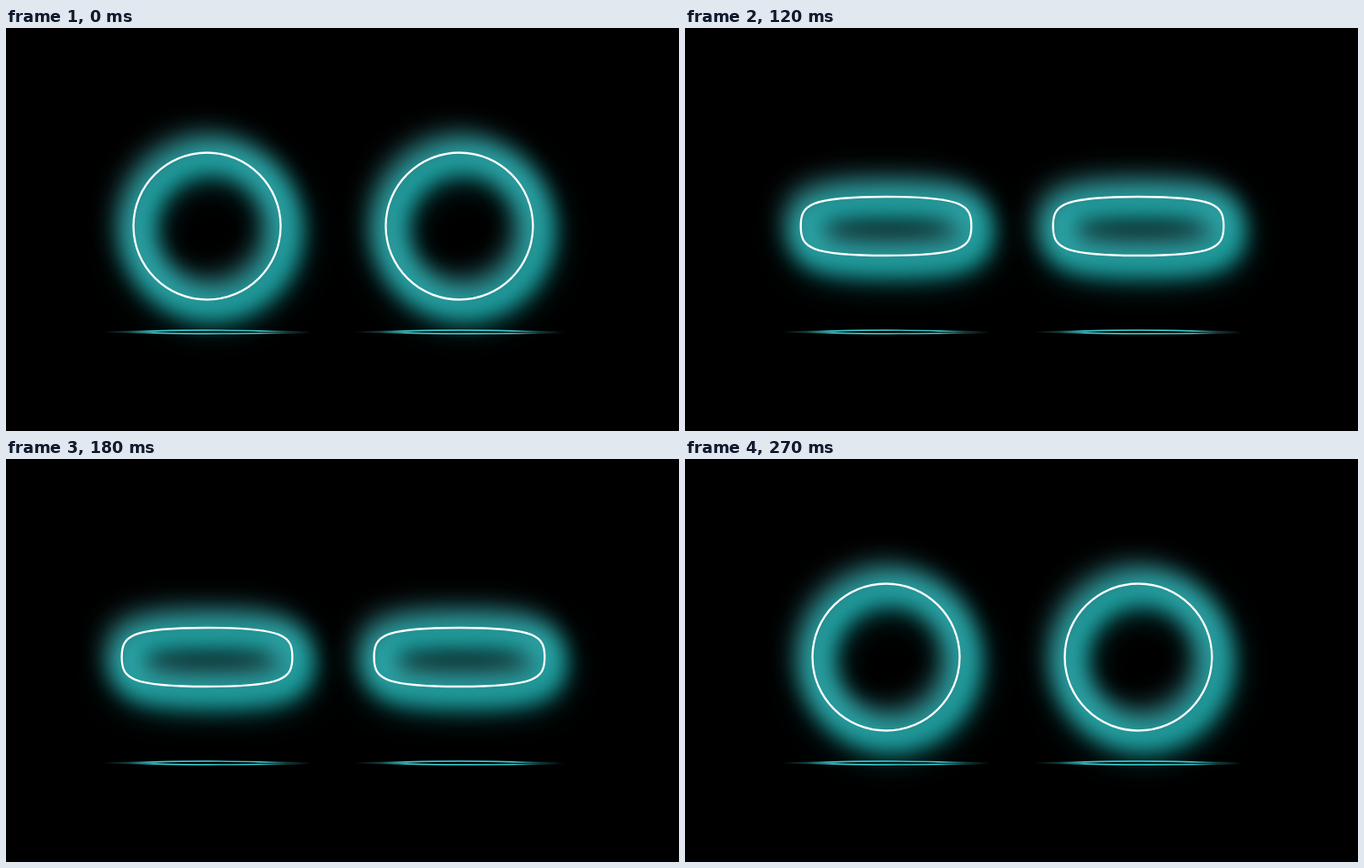
Write an HTML page that moves like this. It is 800 px wide and 480 px high and loops after 360 ms.

```html
<!DOCTYPE html>
<html lang="en">
<head>
<meta charset="utf-8">
<title>Blinking neon eyes</title>
<style>
  html, body { margin: 0; width: 100%; height: 100%; overflow: hidden; background: #000; }
  svg { display: block; width: 800px; height: 480px; }

  .eye { fill: none; animation: blink 360ms infinite; }
  .halo { stroke: #18a5a5; stroke-width: 34; stroke-opacity: .6; filter: blur(20px); }
  .teal { stroke: #18a3a3; stroke-width: 30; filter: blur(13px); }
  .pale { stroke: #5abac2; stroke-width: 34; stroke-opacity: .38; filter: blur(15px); }
  .line { stroke: #fff; stroke-width: 2.4; }
  .floor { fill: none; stroke: url(#fade); stroke-width: 1.6; }

  /* Four equal steps closing, four opening, 30 ms each */
  @keyframes blink {
    0%, 8.333% {
      d: path("M-87.5 0 C-87.5 -48.3 -48.3 -87.5 0 -87.5 S87.5 -48.3 87.5 0 S48.3 87.5 0 87.5 S-87.5 48.3 -87.5 0 Z");
      animation-timing-function: steps(4, end);
    }
    41.66% {
      d: path("M-106 0 C-106 -17 -107 -17.5 0 -17.5 S106 -17 106 0 S107 17.5 0 17.5 S-106 17 -106 0 Z");
      animation-timing-function: steps(4, end);
    }
    75%, 100% {
      d: path("M-87.5 0 C-87.5 -48.3 -48.3 -87.5 0 -87.5 S87.5 -48.3 87.5 0 S48.3 87.5 0 87.5 S-87.5 48.3 -87.5 0 Z");
    }
  }
</style>
</head>
<body>
<svg viewBox="0 0 800 480">
  <defs>
    <linearGradient id="fade" gradientUnits="userSpaceOnUse" x1="-124" y1="0" x2="124" y2="0">
      <stop offset="0" stop-color="#3fd0d4" stop-opacity="0"/>
      <stop offset=".12" stop-color="#3fd0d4" stop-opacity=".3"/>
      <stop offset=".25" stop-color="#3fd0d4"/>
      <stop offset=".5" stop-color="#35c0c4"/>
      <stop offset=".75" stop-color="#3fd0d4"/>
      <stop offset=".88" stop-color="#3fd0d4" stop-opacity=".3"/>
      <stop offset="1" stop-color="#3fd0d4" stop-opacity="0"/>
    </linearGradient>
    <path id="lens" d="M-124 0 C-70 -.4 -50 -2.1 0 -2.1 S70 -.4 124 0 S50 2.1 0 2.1 S-70 .4 -124 0 Z"/>
  </defs>

  <g transform="translate(239 236)">
    <g transform="translate(6 9)"><path class="eye halo"/></g>
    <g transform="translate(7 7)"><path class="eye teal"/></g>
    <g transform="translate(-4 -10)"><path class="eye pale"/></g>
    <path class="eye line"/>
  </g>
  <g transform="translate(538.9 236)">
    <g transform="translate(6 9)"><path class="eye halo"/></g>
    <g transform="translate(7 7)"><path class="eye teal"/></g>
    <g transform="translate(-4 -10)"><path class="eye pale"/></g>
    <path class="eye line"/>
  </g>

  <use href="#lens" class="floor" transform="translate(239 362)"/>
  <use href="#lens" class="floor" transform="translate(539 362)"/>
</svg>
</body>
</html>
```
